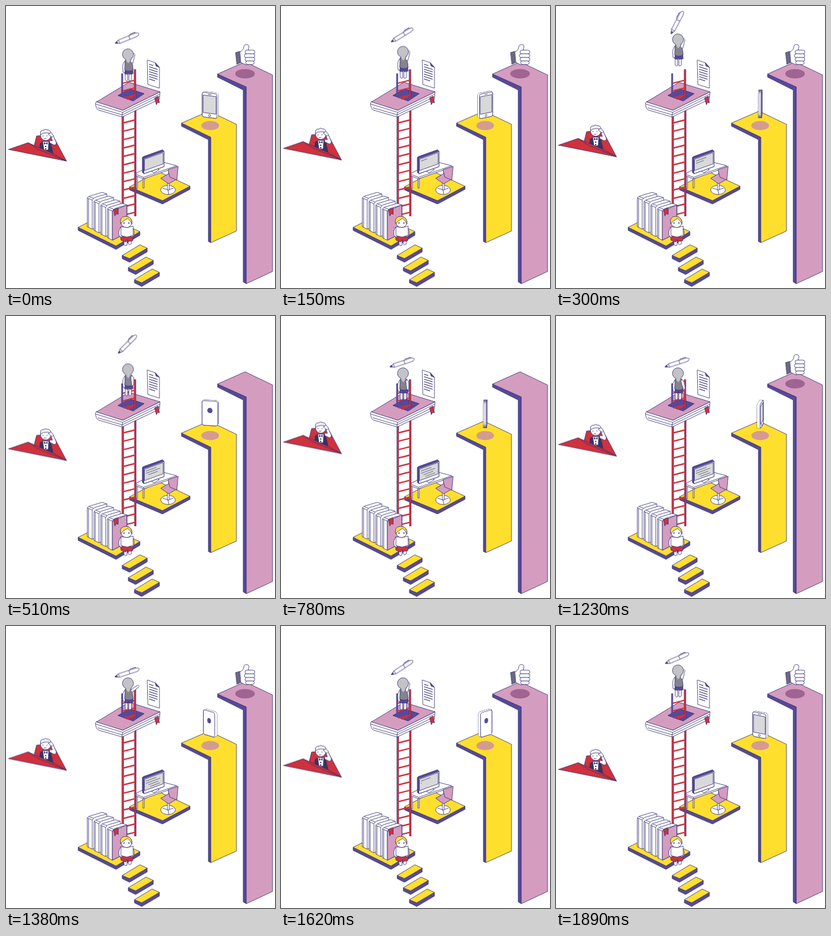
Animation, 440 px wide and 460 px high, one loop 1.92 s. Source, as an HTML page:

```html
<!DOCTYPE html>
<html lang="en">
<head>
<meta charset="utf-8">
<title>Isometric study steps</title>
<style>
  html, body { margin: 0; width: 100%; height: 100%; overflow: hidden; background: #fff; }
  svg { display: block; width: 440px; height: 460px; stroke: #35306f; stroke-width: .8; stroke-linejoin: round; fill: #fff; }
  .pink { fill: #d49dc0; }
  .yellow { fill: #ffdf2e; }
  .purple { fill: #56499a; }
  .red { fill: #d0313d; }
  .gray { fill: #d9d9db; }
  .hair { fill: #c3c3c6; }
  .vest { fill: #85838e; }
  .suit { fill: #37335f; }
  .bare { stroke: none; }
  .line { fill: none; }
  .edge { fill: none; stroke-width: 3.4; }
  .rail { fill: none; stroke: #d0313d; stroke-width: 2.3; }
  .rung { fill: none; stroke: #d0313d; stroke-width: 20; stroke-dasharray: 2.4 11.3; }
  #phone rect { vector-effect: non-scaling-stroke; }

  .plane, .girl, .arm, .pen, .thumb, .hole, .type path { animation: 1920ms infinite; }

  .plane { animation-name: float; animation-timing-function: cubic-bezier(.37, 0, .63, 1); }
  @keyframes float { 49% { transform: translateY(-30.5px); } }

  /* Two hops; the first one crosses the loop seam. */
  .girl { animation-name: hop; animation-timing-function: linear; }
  @keyframes hop {
    0% { transform: translateY(-15px); animation-timing-function: cubic-bezier(.4, .5, .7, .9); }
    2.6% { transform: none; }
    4.7% { transform: none; animation-timing-function: cubic-bezier(.33, .67, .67, 1); }
    16.1% { transform: translateY(-39px); animation-timing-function: cubic-bezier(.33, 0, .67, .33); }
    27.6%, 84.9% { transform: none; animation-timing-function: cubic-bezier(.33, .67, .67, 1); }
    93.75% { transform: translateY(-30px); animation-timing-function: cubic-bezier(.33, 0, .67, .4); }
    100% { transform: translateY(-15px); }
  }

  .arm { transform-origin: 206px 106px; animation-name: reach; animation-timing-function: ease-in-out; }
  @keyframes reach {
    0%, 18% { transform: rotate(-160deg); }
    26.5%, 62% { transform: none; }
    71.9% { transform: rotate(-122deg); }
    80%, 100% { transform: rotate(-160deg); }
  }

  .pen { animation-name: pen; animation-timing-function: ease-in-out; }
  @keyframes pen {
    0%, 100% { transform: translate(198px, 53px) rotate(-22deg); }
    4.7% { transform: translate(198px, 52px) rotate(-25deg); }
    15.6% { transform: translate(198px, 27px) rotate(-62deg); animation-timing-function: ease-in; }
    26.6% { transform: translate(198.5px, 46px) rotate(-45deg); animation-timing-function: ease-out; }
    35%, 77% { transform: translate(198px, 76.5px) rotate(-18deg); }
    84.4% { transform: translate(198px, 68px) rotate(-33deg); }
    91% { transform: translate(198px, 58px) rotate(-34deg); }
    98.4% { transform: translate(198px, 53px) rotate(-23deg); }
  }

  .thumb, .hole { transform-origin: 391px 111px; animation-timing-function: ease-in-out; }
  .thumb { animation-name: thumb; }
  @keyframes thumb {
    0%, 16% { transform: none; }
    23.5%, 46% { transform: scale(0); }
    54.7%, 56% { transform: translateY(-5px) scale(1.22); }
    62%, 100% { transform: none; }
  }
  .hole { animation-name: hole; }
  @keyframes hole {
    0%, 20% { transform: none; }
    25.5%, 42% { transform: scale(0); }
    48%, 100% { transform: none; }
  }

  .type path { fill: none; stroke: #55536a; stroke-dasharray: 1 2; animation-timing-function: linear; }
  .type :nth-child(1) { animation-name: type1; }
  .type :nth-child(2) { animation-name: type2; }
  .type :nth-child(3) { animation-name: type3; }
  .type :nth-child(4) { animation-name: type4; }
  @keyframes type1 { 0%, 3%, 91%, 100% { stroke-dashoffset: 1.1; } 11%, 84% { stroke-dashoffset: 0; } }
  @keyframes type2 { 0%, 11%, 85%, 100% { stroke-dashoffset: 1.1; } 19%, 81% { stroke-dashoffset: 0; } }
  @keyframes type3 { 0%, 19%, 82%, 100% { stroke-dashoffset: 1.1; } 27%, 78% { stroke-dashoffset: 0; } }
  @keyframes type4 { 0%, 27%, 79%, 100% { stroke-dashoffset: 1.1; } 35%, 75% { stroke-dashoffset: 0; } }
</style>
</head>
<body>
<svg viewBox="0 0 440 460">
  <defs>
    <g id="step">
      <path class="purple" d="M190 407V412L202 418L231 401V395Z"/>
      <path class="yellow" d="M190 407L219 389.500L231 395L202 412Z"/>
    </g>
    <g id="book">
      <path d="M0 1Q1 -1 4 -2L24 -8L32 -5.500V40L8 52L0 48Z"/>
      <path class="line" d="M0 1L8 4.500V52M8 4.500Q10 1 13 0L32 -5.500M3 -1L10 1.500M2 2V49"/>
    </g>
    <path id="low-rails" d="M191 172V339M211.500 168V343"/>
  </defs>

  <!-- tall columns -->
  <path class="purple" d="M346 111L393 132V453L388 450V137L346 116Z"/>
  <path class="pink" d="M346 111L391 91L436 112.500V433L393 453V132Z"/>
  <ellipse class="hole bare" cx="391" cy="110.500" rx="16" ry="7.700" style="fill:#a06493"/>
  <path class="purple" d="M287 191L335 214V386L331 384V218L287 196Z"/>
  <path class="yellow" d="M287 191L332 171.500L377 193V367L335 386V214Z"/>
  <ellipse class="bare" cx="334" cy="195" rx="14.500" ry="7.500" style="fill:#d59b90"/>

  <g class="thumb">
    <path class="vest" d="M375.500 76L382.500 74L384 92L377.500 95Z"/>
    <path class="line" d="M377.500 75.500L379.500 94M380 74.700L382 93"/>
    <path d="M382.500 75Q389 72 389 66Q390 62 395 63Q399 64 396 72L402 73V94L392 96L384 92Z"/>
    <rect x="391" y="72" width="16" height="6.200" rx="3"/>
    <rect x="390" y="78" width="17" height="6.200" rx="3"/>
    <rect x="391" y="84" width="16" height="6" rx="3"/>
    <rect x="392" y="89.700" width="14" height="5.600" rx="2.800"/>
  </g>

  <g id="phone">
    <g id="slabs"></g>
    <g id="face">
      <rect x="-13" y="-20" width="26" height="40" rx="3"/>
      <g id="front">
        <rect class="gray" x="-11.500" y="-15.500" width="23" height="28.500"/>
        <circle cy="16.700" r="1.800"/>
        <path class="line" d="M-3 -17.700H3"/>
      </g>
      <circle id="back" class="purple bare" cy="-4.500" r="4.300"/>
    </g>
  </g>

  <!-- desk corner -->
  <path class="purple" d="M202 295V300L256 323L301 299V294L256 317Z"/>
  <path class="yellow" d="M202 295L249 270L301 294L256 317.500Z"/>
  <path d="M213 275V298H215V275ZM224 279V297H226V279ZM266 266V285H268V266Z"/>
  <path d="M211 274L250 253L279 260.500V263L225 282L211 276.500Z"/>
  <path class="line" d="M211 274L225 279.500L279 260.500M225 279.500V282"/>
  <path d="M237 269L246 264.500L251 267L242 272Z"/>
  <path class="purple" d="M223 247L225 245.500L256 234.500L258.500 237V262L226 273.500L223 271.500Z"/>
  <path d="M225.500 249L258.500 237V262L225.500 273.500Z"/>
  <path class="gray" d="M226.500 250L257 239V257.500L226.500 268.500Z"/>
  <g class="type">
    <path pathLength="1" d="M229 253L246 246.800"/>
    <path pathLength="1" d="M229 256.700L252 248.300"/>
    <path pathLength="1" d="M233 259L249 253"/>
    <path pathLength="1" d="M236 261.700L252 255.700"/>
  </g>
  <ellipse cx="265" cy="300" rx="12" ry="7.500"/>
  <path class="line" d="M265 300L256 297M265 300L274 297M265 300L266 307"/>
  <path d="M264 287H267V300H264Z"/>
  <path class="pink" d="M253 281L266 273.500L280 282L266 290Z"/>
  <path class="pink" d="M265 267L281.500 261.500L279.500 284L268 279Z"/>

  <!-- lower ladder -->
  <use href="#low-rails" class="edge"/>
  <g transform="translate(201.500 187)skewY(-14)"><path class="rung" d="M0 0V153"/></g>
  <use href="#low-rails" class="rail"/>

  <!-- big book -->
  <path d="M149 155.500Q145 157 147 163Q148 169 152 170L190 181L251 152L252 140L191 170Z"/>
  <path class="line" d="M147 160L191 173.500Q189 177 190 181M191 173.500L251 144M150 166L190 177.500L251 148"/>
  <path class="pink" d="M148 156.500L201 124.500L252 140L191 170Z"/>
  <path class="red" d="M243 150L249 147L251 158L248 157L246 161Z"/>
  <path class="purple" d="M183 146L202 135L226 143L208 155Z"/>
  <path class="rail" d="M197 152L209 147"/>

  <!-- upper ladder -->
  <path class="edge" d="M190 110V147" style="stroke:#56499a;stroke-width:3"/>
  <path class="edge" d="M211 103.500V150"/>
  <path class="rail" d="M211 103.500V150M191 126L211 121M191 138.500L211 133.500M192 150L211 145"/>

  <!-- sheet -->
  <path d="M231 88L244 92.500L251 100V134L232 128Z"/>
  <path class="purple" d="M244 92.500L245.500 98L251 100Z"/>
  <path class="line" d="M234 95L241 97.300M234 99L248 103.600M234 103L248 107.600M234 107L248 111.600M234 111L248 115.600M234 115L248 119.600M234 119L244 122.300" style="stroke-width:1.1"/>

  <g class="girl">
    <path d="M195 122H199V136Q196 138 195 135ZM201 122H205V135Q203 138 201 136Z"/>
    <path class="purple" d="M194 116H207L208 125L201.500 126L200.500 123L199 126L194 125Z"/>
    <path d="M195 104Q190 108 191 118L191.500 123H194.500L196 112Z"/>
    <path class="vest" d="M195 103Q200 100 206 103L208 119Q201 123 194 119Z"/>
    <g class="arm"><path d="M204 105Q207 103 209 107L209 118Q208 122 205.500 119Z"/></g>
    <circle class="hair" cx="199.500" cy="93.500" r="9"/>
    <path class="hair bare" d="M196 99Q200 95 204 99Q204 104 200 108Q196 104 196 99Z"/>
  </g>

  <g class="pen">
    <path d="M-21 0L-14 -3H16Q21 -2.500 21 0T16 3H-14Z"/>
    <path class="purple" d="M-21 0L-17 -1.700V1.700Z"/>
    <path class="line" d="M-14 -3V3M4 -3V3M5 -3L7 -4.500H16V-3"/>
  </g>

  <!-- bookshelf corner -->
  <path class="purple" d="M118 361V366L180 397L219 374V368L180 391Z"/>
  <path class="yellow" d="M118 361L158 341L219 368L180 391.500Z"/>
  <use href="#book" x="133" y="312"/>
  <use href="#book" x="144" y="318"/>
  <use href="#book" x="155" y="324"/>
  <use href="#book" x="166" y="330"/>
  <path class="pink" d="M174 334.500L197.500 324.500V370L174 382Z"/>
  <path class="red" d="M176 332L183.500 329.500V340L180.500 338.500L178 342.500Z"/>

  <!-- reader -->
  <path d="M193 381H198V390Q194 392 193 389ZM200 381H205V388Q202 391 200 388Z"/>
  <path class="red" d="M187 373H209L207 383L200 384L198 381L196 385L188 382Z"/>
  <path d="M188 360Q183 366 185 375L190 378ZM206 360Q211 366 209 375L204 377Z"/>
  <circle cx="197" cy="352.500" r="9"/>
  <path class="yellow" d="M187.500 355Q185 343.500 196 343Q207 344 206 356Q204 350 199 346.500Q193 349 187.500 355Z"/>
  <path class="line" d="M193 353V355M201 353V355" style="stroke-width:1.600"/>
  <path d="M188 360L198 361.500L208 359V374L198 377L188 374.500Z"/>

  <use href="#step"/>
  <use href="#step" x="10" y="20"/>
  <use href="#step" x="20" y="39.500"/>

  <g class="plane">
    <path class="red" d="M46 228L50 212L76 210L99 253Z"/>
    <path class="suit" d="M56 224Q65 217 73 223L78 245L54 240Z"/>
    <path d="M60 221H70L69 235H62Z"/>
    <path class="suit bare" d="M62 222L65 224L68 222V226L65 224.500L62 226ZM64 228H66V230H64ZM64 232H66V234H64Z"/>
    <path d="M71 223L79 227Q83 226 82 222L77 211L73 212L76 220L72 219Z"/>
    <circle cx="65" cy="211" r="8.500"/>
    <path class="hair" d="M56.500 210Q55 202 62 202.500Q64 200 67 202Q74 202 73.500 209Q70 206 65 207Q60 207 56.500 210Z" style="fill:#f1f1f3"/>
    <path class="line" d="M60.500 211V213M67 211V213M62 216Q64 217 66 216"/>
    <path d="M69 209L74 206.500L78 212L75 214Z"/>
    <path class="red" d="M4 234L36 223L75 240L99 253Z"/>
    <path class="line" d="M36 223L51 233L99 253"/>
  </g>
</svg>
<script>
  const $ = id => document.getElementById(id);
  const LOOP = 1920, TURN = LOOP / 2, DEPTH = 5, TILT = .3, LAYERS = 6;

  // The phone is a stack of thin slabs, stroked first and then covered in white.
  const slab = stroke => {
    const r = document.createElementNS('http://www.w3.org/2000/svg', 'rect');
    const box = { x: -13, y: -20, width: 26, height: 40, rx: 3 };
    for (const k in box) r.setAttribute(k, box[k]);
    if (!stroke) r.setAttribute('class', 'bare');
    return $('slabs').appendChild(r);
  };
  const slabs = [true, false].flatMap(stroke =>
    Array.from({ length: LAYERS }, (_, i) => ({ el: slab(stroke), at: i / (LAYERS - 1) - .5 })));

  let start;
  function draw(now) {
    start ??= now;
    const a = ((now - start) % LOOP - 60) / TURN * 2 * Math.PI;
    const c = Math.cos(a), s = Math.sin(a), near = c >= 0 ? 1 : -1;
    // A zero width would make the matrix singular and hide the phone edge-on.
    const wide = near * Math.max(Math.abs(c), .03);
    const place = (el, at) => {
      const d = at * DEPTH * near;
      el.setAttribute('transform',
        `matrix(${wide} ${-TILT * s} 0 1 ${334 + s * d} ${159.7 + 1.8 * c + TILT * c * d})`);
    };
    slabs.forEach(({ el, at }) => place(el, at));
    place($('face'), .5);
    $('front').style.display = near > 0 ? '' : 'none';
    $('back').style.display = near > 0 ? 'none' : '';
    requestAnimationFrame(draw);
  }
  requestAnimationFrame(draw);
</script>
</body>
</html>
```
